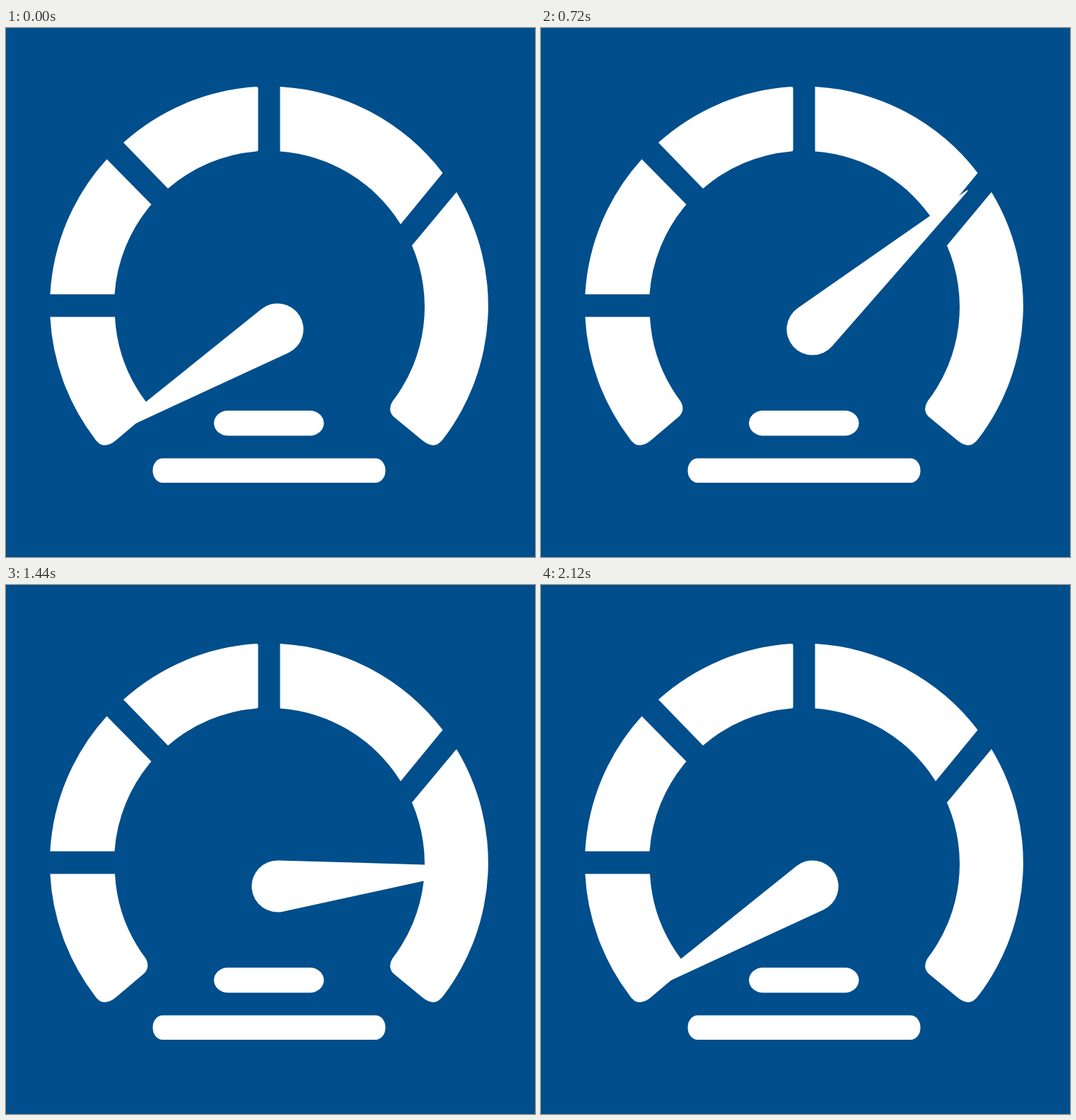
These frames come from a looping animation (748 px wide and 748 px high, 2200 ms). An HTML page:

```html
<!DOCTYPE html>
<html lang="en">
<head>
<meta charset="utf-8">
<title>Gauge</title>
<style>
  html, body { margin: 0; width: 100%; height: 100%; overflow: hidden; background: #004e8c; }
  svg { display: block; width: 100vw; height: 100vh; }
</style>
</head>
<body>
<svg viewBox="0 0 748 748" fill="#fff">
  <g id="dial">
    <path d="M62.4 408.5A310.5 310.5 0 0 0 125 580Q131 590 140 590Q148 589.5 156 582.5L195 549.5Q204.500 540 197.500 528A219 219 0 0 1 154 408.5Z"/>
    <path d="M62.400 376.500A310.500 310.500 0 0 1 142.500 185.500L205.500 249.500A219 219 0 0 0 153.500 376.500Z"/>
    <path d="M166 162A310.500 310.500 0 0 1 354 83Q356.500 83 356.500 85V172Q356.500 174.500 354 174.500A219 219 0 0 0 229 227Z"/>
    <path d="M387.500 83A310.500 310.500 0 0 1 617.500 205L558 277.500A219 219 0 0 0 387.500 174.500Z"/>
    <path d="M637 232A310.500 310.500 0 0 1 619 580Q612 590 603.500 590Q596.500 589.500 588 582.500L548 549.500Q539 540 546.500 528A219 219 0 0 0 574 307.500Z"/>
  </g>
  <rect x="294" y="541" width="155.500" height="35.500" rx="20" ry="17.700"/>
  <rect x="207.500" y="608.500" width="329" height="34.500" rx="14" ry="17"/>
  <path id="needle"/>
</svg>
<script>
  const LOOP = 2200, STEP = 40;
  const PIVOT = [384, 426], HUB = 36.6, APEX = 301, TIP = 295;

  // [time in ms, degrees clockwise from straight up]
  const poses = [
    [0, -121.8], [560, 46], [600, 46], [1440, 84.7], [2080, -121.8], [LOOP, -121.8]
  ];

  const needle = document.getElementById('needle');

  // Straight sides tangent to the round hub, meeting at a slightly blunted apex.
  function needleShape() {
    const sin = HUB / APEX, cos = Math.sqrt(1 - sin * sin);
    const x = HUB * cos, y = -HUB * sin;
    const near = TIP - 4, half = (APEX - near) * sin / cos;
    return `M${-x} ${y}L${-half} ${-near}Q0 ${-TIP - 4} ${half} ${-near}` +
           `L${x} ${y}A${HUB} ${HUB} 0 1 1 ${-x} ${y}Z`;
  }

  const ease = u => u * u * (3 - 2 * u);

  function angleAt(t) {
    const i = poses.findIndex(p => p[0] > t);
    const [t0, a0] = poses[i - 1], [t1, a1] = poses[i];
    return a0 + (a1 - a0) * ease((t - t0) / (t1 - t0));
  }

  function draw(now) {
    const t = Math.floor((now % LOOP) / STEP) * STEP;
    needle.setAttribute('transform', `translate(${PIVOT}) rotate(${angleAt(t)})`);
  }

  needle.setAttribute('d', needleShape());
  const start = performance.now();
  function tick() {
    draw(performance.now() - start);
    requestAnimationFrame(tick);
  }
  tick();
</script>
</body>
</html>
```
